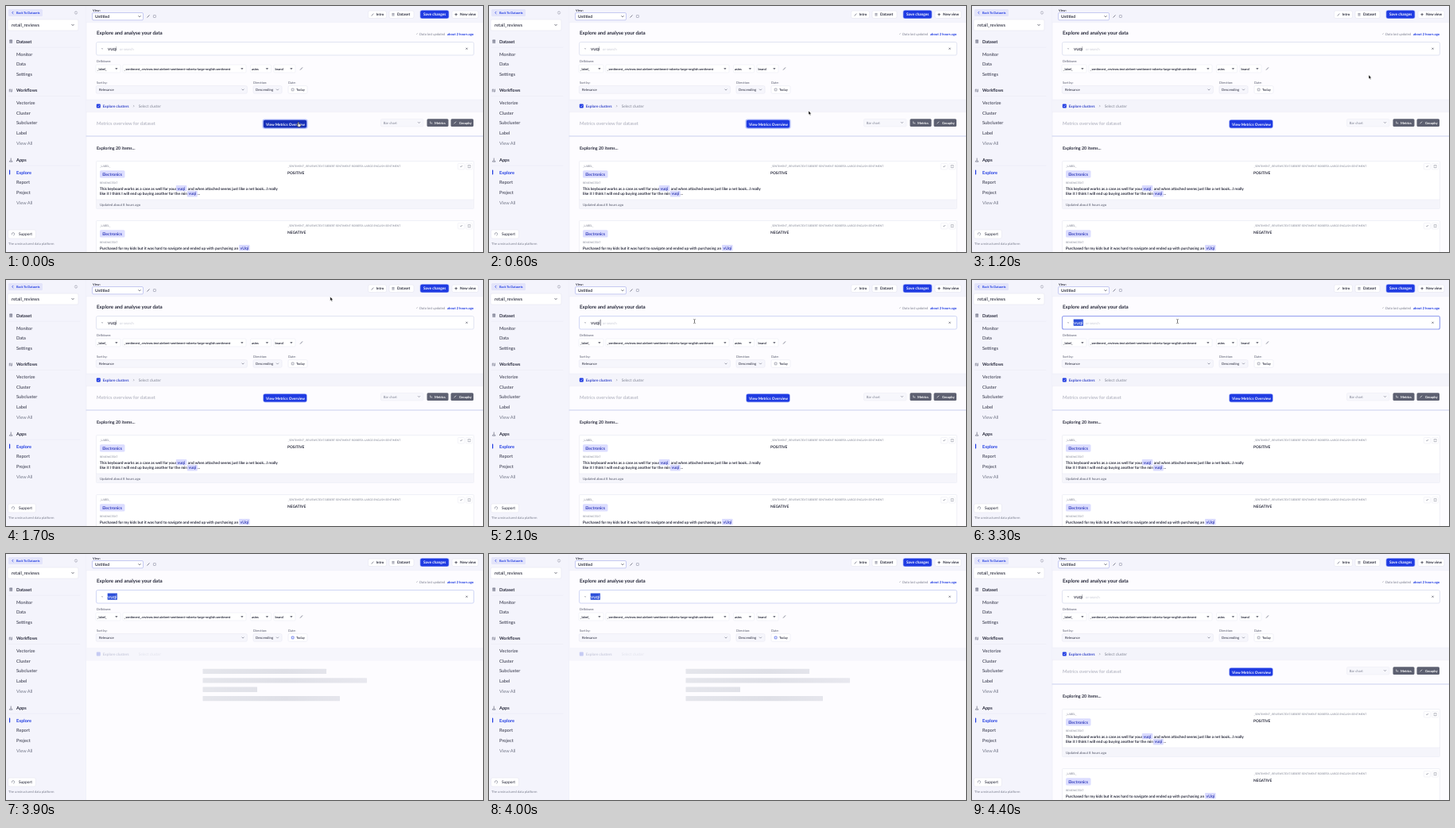
Animation, 600 px wide and 310 px high, one loop 5000 ms. Source, as an HTML page:

```html
<!DOCTYPE html>
<html lang="en">
<head>
<meta charset="utf-8">
<style>
html, body { margin: 0; width: 100%; height: 100%; overflow: hidden; background: #fdfcff; }
svg { display: block; width: 600px; height: 310px; }
text { font-family: Lato, "Open Sans", sans-serif; text-rendering: geometricPrecision; white-space: pre; }
</style>
</head>
<body>
<svg id="stage" viewBox="0 0 600 310" xmlns="http://www.w3.org/2000/svg"></svg>
<script>
const INK = '#27293b', GREY = '#7d8091', SOFT = '#75788a', BLUE = '#1f3be2', LINE = '#e4e5f0';

const text = (x, y, s, size, fill = INK, weight = 400, more = '') =>
  `<text x="${x}" y="${y}" font-size="${size}" fill="${fill}" font-weight="${weight}" ${more}>${s}</text>`;
const bold = (x, y, s, size, fill = INK) => text(x, y, s, size, fill, 700);
const box = (x, y, w, h, fill, stroke = 'none', r = 1.5, more = '') =>
  `<rect x="${x}" y="${y}" width="${w}" height="${h}" rx="${r}" fill="${fill}" stroke="${stroke}" stroke-width=".6" ${more}/>`;
const path = (d, color = INK, w = .7, fill = 'none') =>
  `<path d="${d}" fill="${fill}" stroke="${color}" stroke-width="${w}" stroke-linecap="round" stroke-linejoin="round"/>`;
const chevron = (x, y, color = INK) => path(`M${x - 1.2} ${y - .6}l1.2 1.2 1.2-1.2`, color, .7);
const caret = (x, y) => path(`M${x - 1.1} ${y - .5}h2.2l-1.1 1.2z`, INK, .3, INK);
const pencil = (x, y) => path(`M${x - 1.2} ${y + 1.3}l2.4-2.6`, SOFT, .9);
const group = (id, body) => `<g id="${id}">${body}</g>`;

const dropdown = (x, w, label) =>
  box(x, 74, w, 10, '#fff', '#ebecf5') + bold(x + 1.6, 80.6, label, 3.97) + caret(x + w - 5, 79);

function sidebar() {
  const nav = (y, s, fill = '#3c3e50') => text(13, y, s, 5.7, fill, 500);
  const list = (y, names) => names.map((s, i) =>
    nav(y + i * 12.7, s, s == 'View All' ? GREY : undefined)).join('');
  const heading = (y, s, size) => bold(13, y, s, size) + path(`M3 ${y + 5.2}H93`, '#ebebf5', .6);
  return box(0, 0, 101, 310, '#f4f4fc', 'none', 0) + path('M101 0V310', '#ebebf5', .6) +
    box(3, 4, 43, 9, '#e3e4fa') + path('M9 7.2l-1.3 1.3 1.3 1.3', BLUE) + bold(13, 10.1, 'Back To Datasets', 3.9, BLUE) +
    path('M86.3 8a1.8 1.8 0 0 1 3-.6M89.7 9a1.8 1.8 0 0 1-3 .6', SOFT, .6) +
    box(2, 17, 89, 14, '#fff', LINE, 2) + text(7, 26, 'retail_reviews', 5.8, INK, 500) + chevron(84, 24) +
    box(4.3, 42.6, 3.8, 4.2, '#777a8c', 'none', .6) + path('M4.3 44h3.8M4.3 45.5h3.8', '#f4f4fc', .4) +
    heading(47, 'Dataset', 5.6) + list(62.5, ['Monitor', 'Data', 'Settings']) +
    path('M4.3 108v-3h1.6v3h1.6v-3', SOFT, .7) +
    heading(108.3, 'Workflows', 5.4) + list(124, ['Vectorize', 'Cluster', 'Subcluster', 'Label', 'View All']) +
    path('M6.2 192v1.6M4.5 195.8q1.7-3 3.4 0z', SOFT, .8) +
    heading(196, 'Apps', 5.6) +
    box(4, 206.5, 1.2, 6, BLUE, 'none', .4) + bold(13, 211.6, 'Explore', 5.6, BLUE) +
    list(224.2, ['Report', 'Project', 'View All']) +
    box(2.5, 282, 35, 11, '#fff', LINE, 2) +
    path('M7.4 288v-.8a1.6 1.6 0 0 1 3.2 0v1l-1.2.9', SOFT, .6) + text(16, 289.4, 'Support', 4.85, INK, 500) +
    text(3, 301.4, 'The unstructured data platform', 4.2, GREY);
}

function topBar() {
  return box(101, 0, 499, 20.4, '#f4f4fc', 'none', 0) + path('M101 20.6H600', '#ececf6', .6) +
    bold(109, 6.6, 'View:', 3.8) + box(108.5, 8.5, 64, 9.3, '#fff', '#a3a9ea') +
    bold(112, 15.3, 'Untitled', 4.95) + chevron(168, 13.2) +
    pencil(179, 13) + box(185.4, 11.5, 3, 3, 'none', '#9093a6', .5) +
    box(455.5, 6, 23, 9.5, '#fff', LINE, 2) + path('M460 12.2l2-2.4', SOFT, .8) + bold(465.8, 12.2, 'Intro', 4.4) +
    box(482, 6, 31, 9.5, '#fff', LINE, 2) + path('M485.8 9.4h2.4M485.8 10.7h2.4M485.8 12h2.4', SOFT) + bold(492, 12.2, 'Dataset', 4.7) +
    box(520.6, 5.1, 36.8, 11, '#a9b4f7', 'none', 2.5) + box(521.3, 5.7, 35.4, 9.8, BLUE, 'none', 2) +
    bold(525, 12.3, 'Save changes', 4.8, '#fff') +
    box(561, 6, 33, 9.5, '#fff', LINE, 2) + path('M564.8 10.7h2.6M566.1 9.4v2.6') + bold(571, 12.2, 'New view', 4.6);
}

function filters() {
  return bold(114, 35.8, 'Explore and analyse your data', 6.25) +
    path('M516.5 35.6l1-1', GREY, .5) + text(520, 36.6, 'Data last updated', 4.3, GREY, 400, 'font-style="italic"') +
    bold(555, 36.6, 'about 2 hours ago', 4.15, BLUE) +
    box(113.5, 45.5, 475, 16.5, '#fff', '#cfd3ea', 2, 'id="field"') + path('M120.4 53.6l.7.6.7-.6', SOFT, .6) +
    path('M578.8 53l1.4 1.4m0-1.4l-1.4 1.4', INK, .6) +
    box(127.7, 49.5, 12.2, 8.2, '#2c4fd9', 'none', 0, 'id="selection"') +
    text(128, 56, 'vuqi', 6.1, INK, 500, 'id="query"') +
    text(143, 55.6, 'or search', 4.4, '#c6c8d4', 400, 'id="hint"') +
    group('bar', path('M140.3 50.2v7', INK, .6)) +
    text(114, 70.6, 'Drilldown:', 4, '#55586b') +
    dropdown(113, 31, '_label_') +
    dropdown(147, 155, '_sentiment_.reviews.text.siebert-sentiment-roberta-large-english.sentiment') +
    dropdown(307.5, 26, 'asins') + dropdown(337, 27, 'brand') + pencil(371.5, 79) +
    text(114, 98, 'Sort by:', 4, '#55586b') + box(113.3, 100.6, 190, 9.6, '#f6f6fc', '#e7e8f2') +
    text(117, 107, 'Relevance', 4.25) + chevron(298, 105.5, SOFT) +
    text(311, 98, 'Direction:', 4, '#55586b') + box(311, 100.6, 36, 9.6, '#f6f6fc', '#e7e8f2') +
    text(314, 107, 'Descending', 4.3) + chevron(341.5, 105.5, SOFT) +
    text(355, 98, 'Date:', 4, '#55586b') + box(355, 100.6, 24, 9.6, '#fff', '#e7e8f2') +
    box(359.2, 104, 2.8, 2.8, 'none', SOFT, .3, 'id="day"') + text(365, 107, 'Today', 4.2, INK, 500);
}

function card(y, label, body) {
  const icon = (x, d) => box(x, y + 3, 8, 7.5, '#fff', '#ecedf5', 1) + path(d, SOFT, .6);
  return box(113.5, y, 475, 60, '#fff', '#e6e7f2', 1) +
    text(118, y + 7.8, '_LABEL_', 3.5, GREY) +
    box(118, y + 11.8, 31.5, 9.2, '#dcddff') + bold(121.2, y + 18, 'Electronics', 5.1, '#323dbb') +
    text(118, y + 28.4, 'REVIEWS.TEXT', 3.25, GREY) +
    text(354.5, y + 7.8, '_SENTIMENT_.REVIEWS.TEXT.SIEBERT-SENTIMENT-ROBERTA-LARGE-ENGLISH.SENTIMENT', 3.37, GREY) +
    bold(354, y + 16.6, label, 4.8) +
    icon(568.5, `M571.6 ${y + 6.9}l.7.7 1.4-1.8`) +
    icon(578.5, `M581.2 ${y + 6}v-.8h.8M583.2 ${y + 5.2}h.8v.8M584 ${y + 7.4}v.8h-.8M582 ${y + 8.2}h-.8v-.8`) + body;
}

function results() {
  const mark = (x, y, w, s) => box(x, y - 5.6, w, 7.6, '#dadbff', 'none', 1) + bold(x + 1.6, y, s, 5.2, '#3a43b4');
  const line = (x, y, s) => bold(x, y, s, 4.75);
  return box(101, 118, 499, 15.5, '#f4f4fb', 'none', 0) + path('M101 118.2H600M101 133.6H600', '#eaebf5', .5) +
    box(113.8, 123.6, 5, 5, BLUE, 'none', 1) + path('M115.2 126.1l.9.9 1.4-1.7', '#fff', .5) +
    bold(121.7, 128, 'Explore clusters', 4.65, '#3142c9') + path('M160.4 125.2l.8.9-.8.9', GREY, .5) +
    text(166.7, 128, 'Select cluster', 4.8, GREY) +
    text(114, 149.6, 'Metrics overview for dataset', 5.9, '#a9abb9') +
    path('M101 164H600', '#c9cfee', 1) +
    box(322.4, 142.6, 57.2, 12.2, '#b9c5fb', 'none', 2.8, 'id="ring"') +
    box(323.2, 143.2, 55.6, 11, '#a9b4f7', 'none', 2.4) +
    box(323.9, 143.8, 54.2, 9.8, BLUE, 'none', 2, 'id="metrics"') + bold(327, 150.5, 'View Metrics Overview', 4.7, '#fff') +
    box(471.5, 142.4, 53.5, 9.6, '#f7f7fc', '#ecedf5') + text(474.7, 148.6, 'Bar chart', 4.3, GREY) + chevron(519.5, 147, GREY) +
    box(529.5, 142.3, 27, 9.8, '#5d6071') + path('M533.8 145.8v2h2.2', '#fff', .6) + bold(539, 148.6, 'Metrics', 4.1, '#fff') +
    box(559.5, 142.3, 28.5, 9.8, '#5d6071') + path('M563.8 148l2-2', '#fff', .7) + bold(570, 148.6, 'Groupby', 4.05, '#fff') +
    bold(114, 180.7, 'Exploring 20 items...', 5.4) +
    card(195.5, 'POSITIVE',
      line(118, 231.6, 'This keyboard works as a case as well for your') + mark(213.8, 231.6, 13.6, 'vuqi') +
      line(228.8, 231.6, 'and when attached seems just like a net book…I really') +
      line(118, 238.4, 'like it I think I will end up buying another for the mini') + mark(227.8, 238.4, 13, 'vuqi') +
      line(240.6, 238.4, '…') +
      box(113.8, 244, 474.4, 11.2, '#f5f5fb', 'none', 0) + path('M113.5 244H588.5', '#e6e7f2', .5) +
      text(118, 251.8, 'Updated about 8 hours ago', 4.27, '#55586b')) +
    card(270.5, 'NEGATIVE',
      line(118, 306.6, 'Purchased for my kids but it was hard to navigate and ended up with purchasing an') +
      mark(293, 306.6, 13.6, 'vUqi'));
}

function loading() {
  const ends = [403, 454, 316, 420];
  return box(101, 118, 499, 192, '#fdfcff', 'none', 0) + box(101, 118, 499, 16, '#f6f6fc', 'none', 0) +
    path('M101 134.2H600', '#eeeef7', .5) +
    box(113.8, 123.6, 5, 5, '#c6cbf3', 'none', 1) + bold(121.7, 128, 'Explore clusters', 4.65, '#c9cbdc') +
    text(166.7, 128, 'Select cluster', 4.8, '#e1e2ec') +
    ends.map((end, i) => box(247.5, 144.8 + i * 11.4, end - 247.5, 6.3, 'url(#shine)', 'none', .5)).join('');
}

stage.innerHTML = `<defs><linearGradient id="shine" gradientUnits="userSpaceOnUse" x1="247" x2="454">
  <stop stop-color="#e5e6ec"/><stop offset=".5" stop-color="#dfe0e7"/><stop offset="1" stop-color="#e8e8ef"/></linearGradient></defs>` +
  box(0, 0, 600, 310, '#fdfcff', 'none', 0) + sidebar() + topBar() + filters() +
  group('results', results()) + group('loading', loading()) +
  group('hand', path('M-1 2V-1.4q.7-.8 1.3 0V.6l2 .5q.8.3.5 1.5l-.5 1.6H-.6L-2.4 1.8q.5-.7 1.4.2z', '#111', .6, '#fff')) +
  group('arrow', path('M0 0v4.8l1.1-1 .8 1.8.9-.4-.8-1.7h1.5z', '#fff', .4, '#111')) +
  group('beam', path('M-1-2.6q1 0 1 .7v3.8q0 .7-1 .7M1-2.6q-1 0-1 .7v3.8q0 .7 1 .7', '#444', .5));

const $ = id => document.getElementById(id);
const show = (id, on) => $(id).setAttribute('visibility', on ? 'visible' : 'hidden');
const set = (id, attrs) => { for (const k in attrs) $(id).setAttribute(k, attrs[k]); };

// time, x, y of the pointer
const route = [[0, 368, 148], [400, 368, 148], [1000, 499, 87], [1200, 499, 87],
  [1600, 430, 28], [1750, 400, 19], [2000, 258.5, 52], [5000, 258.5, 52]];

function pointer(t) {
  const i = route.findIndex(p => p[0] > t);
  const [t0, x0, y0] = route[i - 1], [t1, x1, y1] = route[i];
  const u = (t - t0) / (t1 - t0), e = u * u * (3 - 2 * u);
  return [x0 + (x1 - x0) * e, y0 + (y1 - y0) * e];
}

function draw(now) {
  const t = Math.floor(now % 5000 / 100) * 100;
  const within = (a, b) => t >= a && t < b;
  const [x, y] = pointer(t);
  for (const id of ['hand', 'arrow', 'beam']) set(id, { transform: `translate(${x} ${y})` });
  show('hand', t < 500);
  show('arrow', within(500, 2000));
  show('beam', within(2000, 3900));

  const selected = within(2300, 4200), busy = within(3900, 4200), strong = within(2400, 3900);
  show('ring', t < 1100);
  set('metrics', { fill: t < 600 ? '#1730b8' : BLUE });
  set('field', {
    stroke: strong ? '#929dee' : within(2000, 4200) ? '#b3bcef' : '#cfd3ea',
    'stroke-width': strong ? 1.1 : .6
  });
  show('selection', selected);
  set('query', { fill: selected ? '#fff' : INK });
  show('bar', within(2000, 2300));
  show('hint', !busy);
  set('day', { stroke: busy ? BLUE : SOFT });
  show('results', !busy);
  show('loading', busy);
  requestAnimationFrame(tick);
}
const start = performance.now();
const tick = () => draw(performance.now() - start);
tick();
</script>
</body>
</html>
```
